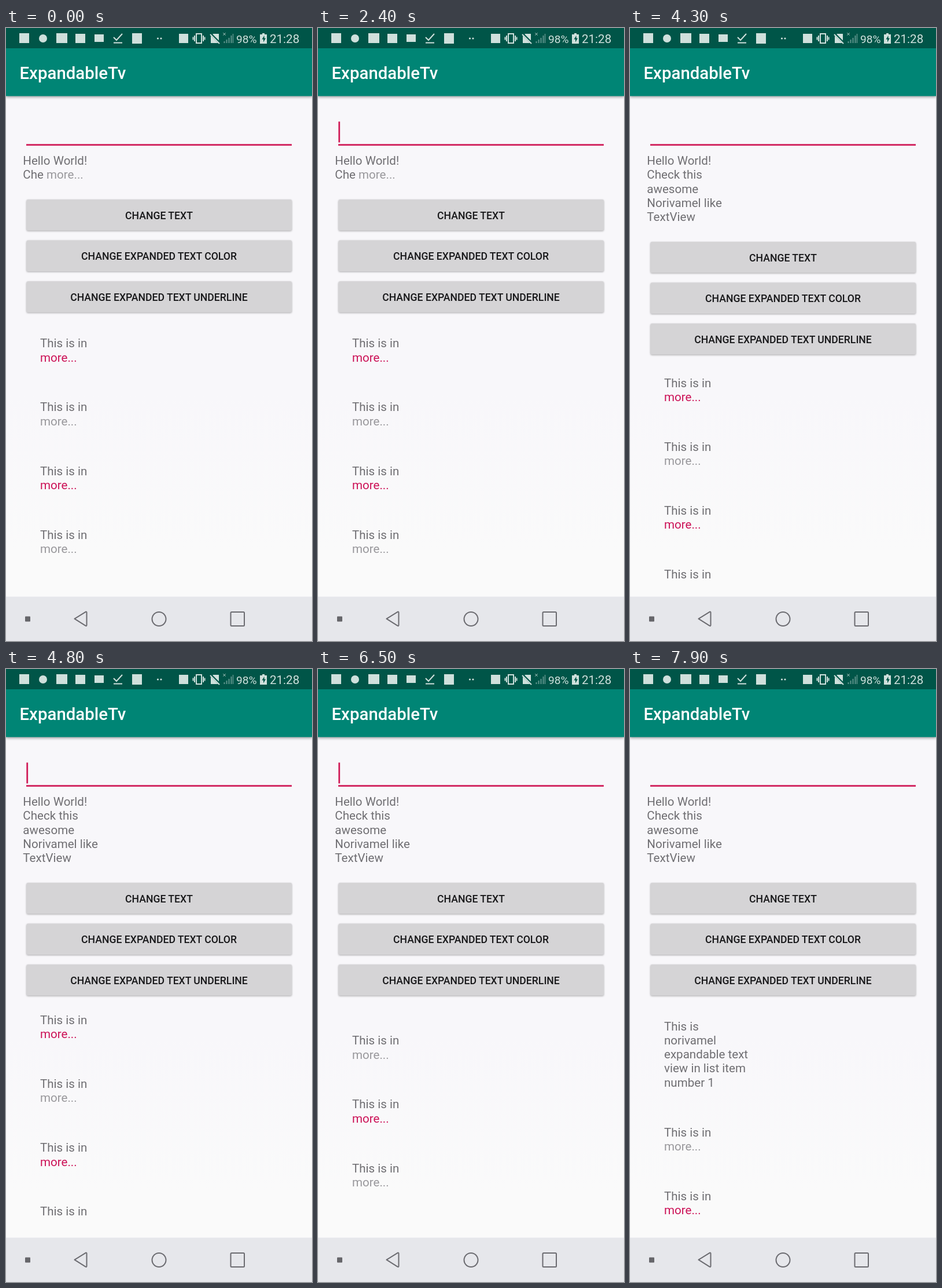
Animation of 529 by 1058 pixels, one loop 8 s. Source, as an HTML page:

```html
<!DOCTYPE html>
<html lang="en">
<head>
<meta charset="utf-8">
<title>ExpandableTv</title>
<style>
  html, body { margin: 0; width: 100%; height: 100%; overflow: hidden; background: #f8f7fa; }
  svg { display: block; width: 100%; height: 100%; }
  text { font: 400 20.57px Roboto, "Noto Sans", sans-serif; fill: #6f6e72; white-space: pre; }
  .title { font-size: 29.4px; font-weight: 500; fill: #fff; }
  .label { font-size: 17.64px; font-weight: 500; fill: #18181a; text-anchor: middle; }
  .status text { fill: #cfe0dc; }
  .gray { fill: #99989c; }
  .pink { fill: #cc1257; }
  .button { fill: #d5d4d6; filter: drop-shadow(0 1.5px 1.5px rgba(0, 0, 0, .32)); }
  .bar { fill: #008575; filter: drop-shadow(0 2px 2px rgba(0, 0, 0, .35)); }
  .icons { fill: #cfe0dc; }
  .line { fill: none; stroke: #cfe0dc; stroke-width: 2; }
  .nav { fill: none; stroke: #6b6b70; stroke-width: 2; stroke-linejoin: round; }
</style>
</head>
<body>
<svg viewBox="0 0 529 1058">
  <defs>
    <linearGradient id="page" x2="0" y2="1">
      <stop offset=".6" stop-color="#f8f7fa"/>
      <stop offset=".85" stop-color="#fafafa"/>
    </linearGradient>
    <clipPath id="listClip"><rect id="listBox" x="0" width="529"/></clipPath>
  </defs>
  <rect width="529" height="1058" fill="url(#page)"/>

  <rect class="bar" y="35" width="529" height="82.5"/>
  <rect width="529" height="35" fill="#005548"/>
  <text class="title" x="23.5" y="88">ExpandableTv</text>

  <g class="status">
    <g class="icons">
      <rect x="23" y="9" width="17" height="17"/>
      <circle cx="64" cy="18" r="7"/>
      <rect x="87" y="9" width="19" height="17"/>
      <rect x="120" y="10" width="17" height="16"/>
      <rect x="153" y="11" width="16" height="13"/>
      <rect x="218" y="9" width="17" height="18"/>
      <circle cx="262.5" cy="18" r="1.6"/>
      <circle cx="268" cy="18" r="1.6"/>
      <rect x="299" y="10" width="16" height="16"/>
      <path d="M358 10h10v16h-14V14z"/>
      <path d="M443 9h4v2h4v16h-12V11h4z"/>
    </g>
    <path d="M446.5 13l-4 6.5h2.5v5l4-7h-2.500z" fill="#005548"/>
    <path class="line" d="M186 16l5 5 10-11M186 25.500h15"/>
    <path class="line" d="M329 10h9v16h-9zM326 13v10M341 13v10M323.500 15.500v5M343.500 15.500v5"/>
    <path d="M353 9.500l17 17" stroke="#005548" stroke-width="4"/>
    <path class="line" d="M353 11l16 16"/>
    <path class="line" d="M375.500 8.500l4 4m0-4l-4 4" style="stroke-width:1"/>
    <path class="line" d="M377.500 26v-3M381.500 26v-6M385.500 26v-9M389.500 26v-13" style="stroke:#5f938b"/>
    <path class="line" d="M392.500 26v-16" style="stroke:#5f938b;stroke-width:1.500"/>
    <text x="398" y="25.500" style="font-size:19.200px">98%</text>
    <text x="456" y="25.700">21:28</text>
  </g>

  <rect x="35" y="200.300" width="459" height="2.800" fill="#d01c58"/>
  <rect id="cursor" x="35.300" y="161.500" width="2.800" height="36" fill="#d01c58"/>

  <g id="intro"></g>
  <g id="buttons"></g>
  <g clip-path="url(#listClip)"><g id="list"></g></g>

  <rect y="981.500" width="529" height="76.500" fill="#e6e7eb"/>
  <rect x="33" y="1015.500" width="9" height="9" rx="1" fill="#66666a"/>
  <g class="nav">
    <path d="M118.500 1019.700L137.500 1007.800Q139.500 1007 139.500 1009V1030.500Q139.500 1032.500 137.500 1031.600Z"/>
    <circle cx="264.500" cy="1020" r="12"/>
    <rect x="388.500" y="1008" width="23.500" height="24" rx="1.500"/>
  </g>
</svg>
<script>
const LOOP = 8000, STEP = 100;
const LINE = 24.3, PITCH = 110.2, GROWTH = 3 * LINE;
const LIST_TOP = 499, LIST_END = 952;
const INTRO_OPENS = 2800, ITEM_OPENS = 5200;

// [time, list offset]
const SCROLL = [
  [4200, 0], [4300, -4.4], [4500, -8.5], [4800, -11.3],
  [6000, -11.3], [6100, -22], [6300, -92], [6500, -159],
  [6750, -182], [7000, -162], [7300, -92], [7600, -25], [7800, -3], [7900, -0.5]
];

const byId = id => document.getElementById(id);

function add(parent, tag, attrs, content = "") {
  const node = document.createElementNS("http://www.w3.org/2000/svg", tag);
  for (const key in attrs) node.setAttribute(key, attrs[key]);
  node.textContent = content;
  parent.append(node);
  return node;
}

function addLines(parent, x, y, lines) {
  const group = add(parent, "g", {});
  lines.forEach((line, i) => add(group, "text", { x, y: y + i * LINE }, line));
  return group;
}

const show = (node, on) => node.setAttribute("visibility", on ? "visible" : "hidden");
const shift = (node, y) => node.setAttribute("transform", `translate(0 ${y})`);

const introShort = addLines(byId("intro"), 29.3, 236, ["Hello World!", "Che "]);
add(introShort.lastChild, "tspan", { class: "gray" }, "more...");
const introFull = addLines(byId("intro"), 29.3, 236,
  ["Hello World!", "Check this", "awesome", "Norivamel like", "TextView"]);

["CHANGE TEXT", "CHANGE EXPANDED TEXT COLOR", "CHANGE EXPANDED TEXT UNDERLINE"].forEach((label, i) => {
  const y = 296 + i * 70.6;
  add(byId("buttons"), "rect", { class: "button", x: 35.5, y, width: 458.5, height: 53.5, rx: 2.5 });
  add(byId("buttons"), "text", { class: "label", x: 264.5, y: y + 33.7 }, label);
});

const items = Array.from({ length: 5 }, (_, i) => {
  const item = addLines(byId("list"), 59, 551.2, ["This is in", "more..."]);
  item.lastChild.setAttribute("class", i % 2 ? "gray" : "pink");
  return item;
});
const itemFull = addLines(byId("list"), 59, 551.2,
  ["This is", "norivamel", "expandable text", "view in list item", "number 1"]);

function scrollAt(t) {
  const next = SCROLL.findIndex(point => point[0] > t);
  if (next === 0) return 0;
  if (next < 0) return SCROLL[SCROLL.length - 1][1];
  const [t0, y0] = SCROLL[next - 1], [t1, y1] = SCROLL[next];
  return y0 + (y1 - y0) * (t - t0) / (t1 - t0);
}

function draw(t) {
  const introOpen = t >= INTRO_OPENS, itemOpen = t >= ITEM_OPENS;
  const drop = introOpen ? GROWTH : 0;

  show(byId("cursor"), Math.floor((t + 100) / 500) % 2 === 1);
  show(introShort, !introOpen);
  show(introFull, introOpen);
  shift(byId("buttons"), drop);

  byId("listBox").setAttribute("y", LIST_TOP + drop);
  byId("listBox").setAttribute("height", LIST_END - LIST_TOP - drop);
  shift(byId("list"), drop + scrollAt(t));
  show(items[0], !itemOpen);
  show(itemFull, itemOpen);
  items.forEach((item, i) => shift(item, i * PITCH + (i && itemOpen ? GROWTH : 0)));
}

const start = performance.now();
function tick() {
  const t = (performance.now() - start) % LOOP;
  draw(Math.floor(t / STEP) * STEP);
  requestAnimationFrame(tick);
}
tick();
</script>
</body>
</html>
```
